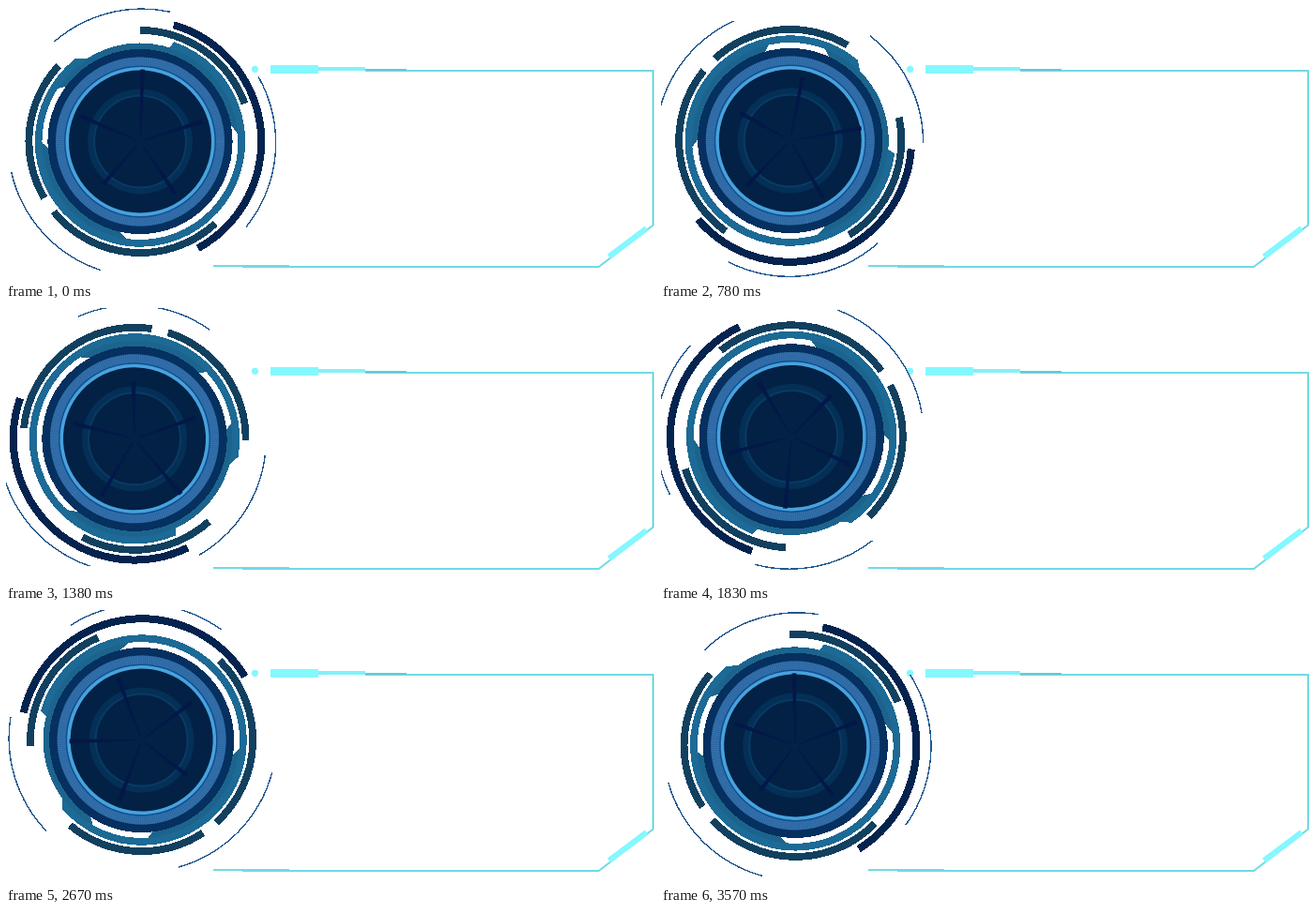
An HTML page for the animation above (3.6 s loop, 692 by 292 pixels).

```html
<!DOCTYPE html>
<html lang="en">
<head>
<meta charset="utf-8">
<title>HUD dial</title>
<style>
  html, body { margin: 0; width: 100%; height: 100%; overflow: hidden; background: #fff; }
  svg { display: block; }
  .hard { shape-rendering: crispEdges; }
</style>
</head>
<body>
<svg width="692" height="292" viewBox="0 0 692 292" fill="none">
  <g stroke="#6fdbe4">
    <path d="M383 69H690V233.5L632 278H302" stroke-width="2"/>
    <path d="M362 68H427" stroke="#63cbd2" stroke-width="2"/>
    <path d="M221 277H302" stroke-width="2"/>
    <path d="M252 278H302" stroke-width="2"/>
    <path d="M333 67H383" stroke="#82f1f8" stroke-width="4"/>
    <path d="M643 267L683 237" stroke="#84f8ff" stroke-width="6"/>
    <path d="M282 67.5H333" stroke="#84f8ff" stroke-width="9"/>
  </g>
  <circle cx="265.5" cy="67.3" r="3.6" fill="#84f8ff"/>
  <g id="dial"><g id="parts" transform="translate(143 144.5)"></g></g>
</svg>
<script>
const parts = document.getElementById('parts');
const dial = document.getElementById('dial');

function add(tag, attrs) {
  const node = document.createElementNS('http://www.w3.org/2000/svg', tag);
  for (const name in attrs) node.setAttribute(name, attrs[name]);
  parts.append(node);
}

function polar(r, deg) {
  const a = deg * Math.PI / 180;
  return `${r * Math.cos(a)} ${r * Math.sin(a)}`;
}

// Band between two radii; the inner edge may have its own angles for slanted ends
function band(inner, outer, [from, to], fill, [innerFrom, innerTo] = [from, to], shift = '0 0') {
  const edge = (r, a, b) =>
    `${polar(r, a)}A${r} ${r} 0 ${+(Math.abs(b - a) > 180)} ${+(b > a)} ${polar(r, b)}`;
  add('path', {
    d: `M${edge(outer, from, to)}L${edge(inner, innerTo, innerFrom)}Z`,
    fill, class: 'hard', transform: `translate(${shift})`
  });
}

function ring(inner, outer, stroke, dash = 'none') {
  add('circle', {
    r: (inner + outer) / 2, stroke, 'stroke-width': outer - inner, 'stroke-dasharray': dash
  });
}

const disc = (r, fill, className = '') => add('circle', { r, fill, class: className });

// Outer arcs
for (const span of [[229, 282], [-29.5, 39], [108, 167.4]])
  band(142, 143.4, span, '#20588f', span, '2 1.3');
band(125.3, 133.3, [-74, 61.5], '#04234e');
for (const span of [[270, 340], [47.5, 141], [149.5, 223]])
  band(114.7, 122.5, span, '#12405f');

// Stepped teal collar
band(98, 105, [98, 179.5], '#1c648d', [103, 176]);
band(98, 105, [212.5, 356], '#1c648d', [217, 349]);
band(104.5, 112.2, [-71, 232], '#1c6a95', [-73, 237.5]);

// Dial face
disc(98.6, '#05305f', 'hard');
ring(80, 90, '#2a65a1');
ring(80, 90, '#3874ad', '1 1.2');
disc(81, '#0f4f92');
disc(79.5, '#48a2dc');
disc(76, '#022145');
ring(48, 56, '#042f56');
ring(48, 50, '#0a3a62');

// Tapered spokes
for (const [angle, length] of [[-88, 77], [-18, 70], [56, 67], [131, 61], [203, 69]])
  add('path', { d: `M5 -.5L${length} -2.4V2.4L5 .5Z`, fill: '#031848', transform: `rotate(${angle})` });

// One turn in 3.6 s, in steps of 3 degrees, slightly off-centre
function draw(now) {
  const step = Math.floor(now % 3600 / 30);
  dial.setAttribute('transform', `rotate(${step * 3} 141 140.75)`);
  requestAnimationFrame(draw);
}
draw(performance.now());
</script>
</body>
</html>
```
